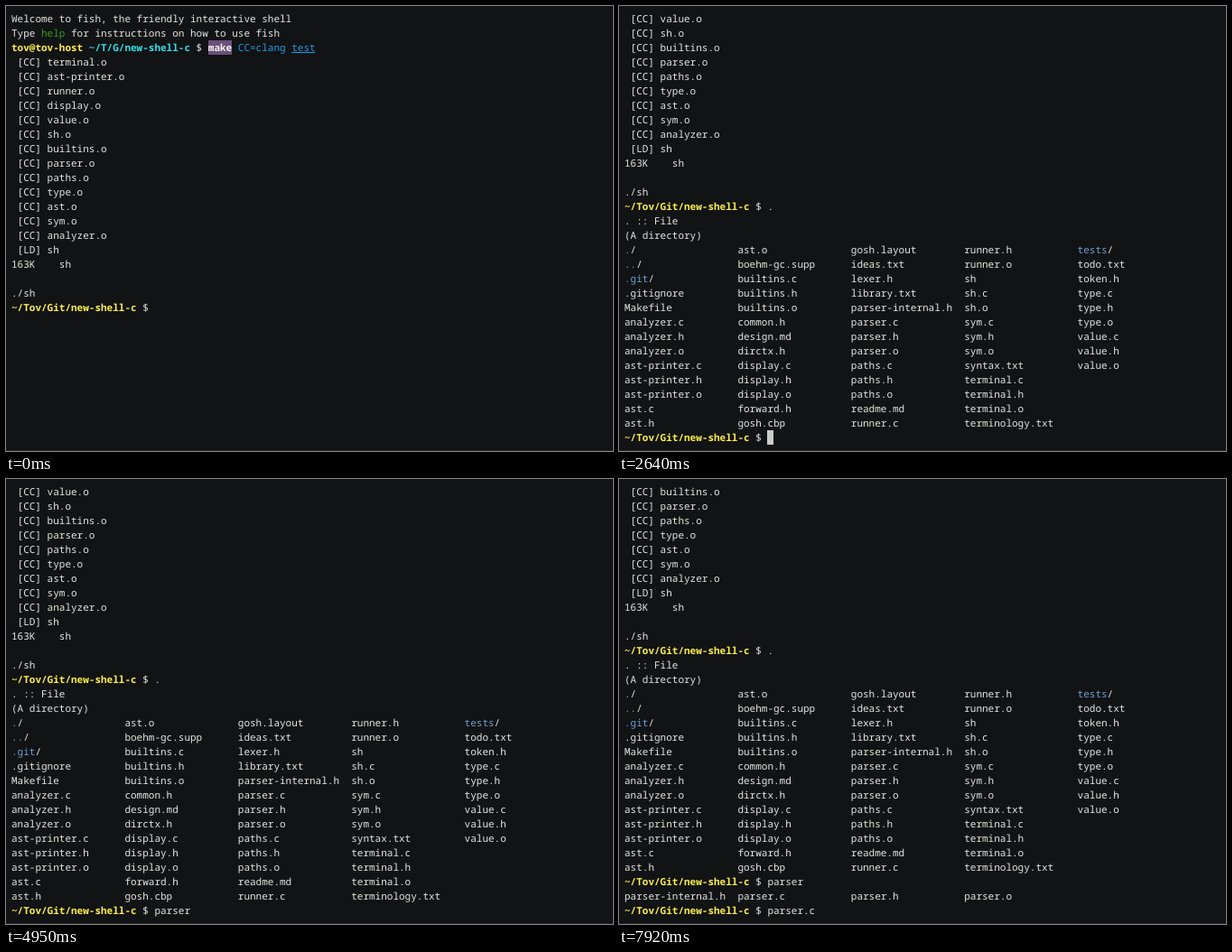
An HTML page with a canvas that plays this animation: 672x493 px, repeating every 8000 ms.

```html
<!DOCTYPE html>
<html lang="en">
<head>
<meta charset="utf-8">
<style>
html, body { margin: 0; width: 100%; height: 100%; overflow: hidden; background: #111315; }
canvas { display: block; }
</style>
</head>
<body>
<canvas id="term" width="672" height="493"></canvas>
<script>
const ctx = document.getElementById('term').getContext('2d');
const CELL = 6.6, LINE = 16, PAD = 6, LOOP = 8000;
const FONT = '11px "Noto Sans Mono", "DejaVu Sans Mono", monospace';

const STYLES = {
  text: { color: '#e6e6e1' },
  help: { color: '#3c9a20' },
  user: { color: '#fcee4f', bold: true },
  path: { color: '#34dfe8', bold: true },
  cmd: { color: '#f4f2f4', bold: true, back: '#6b5079' },
  arg: { color: '#1f9fe6' },
  link: { color: '#1f9fe6', underline: true },
  dir: { color: '#6f9fd2' }
};

// A row is a list of [column, text, style].
const plain = s => [[0, s, 'text']];
const seq = (...parts) => {
  let col = 0;
  return parts.map(([s, style = 'text']) => {
    const run = [col, s, style];
    col += s.length;
    return run;
  });
};
const prompt = typed => seq(['~/Tov/Git/new-shell-c', 'user'], [' $ ' + typed]);
const PROMPT_COLS = 24;

const entry = (name, i) => {
  const col = i * 19;
  if (!name.endsWith('/')) return [[col, name, 'text']];
  return [[col, name.slice(0, -1), 'dir'], [col + name.length - 1, '/', 'text']];
};
const listRow = names => names.flatMap(entry);

const objects = 'terminal ast-printer runner display value sh builtins parser paths type ast sym analyzer';
const files = [
  './ ../ .git/ .gitignore Makefile analyzer.c analyzer.h analyzer.o ast-printer.c ast-printer.h ast-printer.o ast.c ast.h',
  'ast.o boehm-gc.supp builtins.c builtins.h builtins.o common.h design.md dirctx.h display.c display.h display.o forward.h gosh.cbp',
  'gosh.layout ideas.txt lexer.h library.txt parser-internal.h parser.c parser.h parser.o paths.c paths.h paths.o readme.md runner.c',
  'runner.h runner.o sh sh.c sh.o sym.c sym.h sym.o syntax.txt terminal.c terminal.h terminal.o terminology.txt',
  'tests/ todo.txt token.h type.c type.h type.o value.c value.h value.o'
].map(s => s.split(' '));

const build = [
  plain('Welcome to fish, the friendly interactive shell'),
  seq(['Type '], ['help', 'help'], [' for instructions on how to use fish']),
  seq(['tov@tov-host', 'user'], [' '], ['~/T/G/new-shell-c', 'path'], [' $ '],
    ['make', 'cmd'], [' '], ['CC=clang', 'arg'], [' '], ['test', 'link']),
  ...objects.split(' ').map(name => plain(` [CC] ${name}.o`)),
  plain(' [LD] sh'),
  plain('163K    sh'),
  [],
  plain('./sh')
];
const listing = [
  ...build,
  prompt('.'),
  plain('. :: File'),
  plain('(A directory)'),
  ...files[0].map((_, r) => listRow(files.map(c => c[r]).filter(Boolean)))
];
const matches = [
  ...listing,
  prompt('parser'),
  listRow(['parser-internal.h', 'parser.c', 'parser.h', 'parser.o'])
];

// [start, history, typed, cursor shown]
const steps = [
  [0, build, '', false],
  [330, build, '', true],
  [660, build, '', false],
  [990, build, '.', true],
  [1650, listing, '', true],
  [1980, listing, '', false],
  [2640, listing, '', true],
  [2970, listing, '', false],
  [3300, listing, 'pa', true],
  [3630, listing, 'pars', true],
  [4290, listing, 'parser', true],
  [4950, listing, 'parser', false],
  [5280, matches, 'parser', true],
  [5940, matches, 'parser', false],
  [6270, matches, 'parser', true],
  [6930, matches, 'parser', false],
  [7260, matches, 'parser.', true],
  [7590, matches, 'parser.c', true],
  [7920, matches, 'parser.c', false]
];
const VISIBLE = 30;

function block(col, row, cols, color) {
  const x = Math.round(PAD + col * CELL);
  const right = Math.round(PAD + (col + cols) * CELL);
  ctx.fillStyle = color;
  ctx.fillRect(x, PAD + row * LINE, right - x, LINE);
}

function drawRun([col, s, style], row) {
  const { color, bold, back, underline } = STYLES[style];
  const x = PAD + col * CELL, y = PAD + row * LINE + 12;
  if (back) block(col, row, s.length, back);
  ctx.font = (bold ? 'bold ' : '') + FONT;
  ctx.fillStyle = color;
  ctx.fillText(s, x, y);
  if (underline) ctx.fillRect(Math.round(x), y + 1, Math.round(s.length * CELL), 1);
}

function draw(t) {
  const [, history, typed, cursor] = steps.findLast(s => s[0] <= t);
  ctx.fillStyle = '#111315';
  ctx.fillRect(0, 0, 672, 493);
  ctx.textRendering = 'geometricPrecision';
  const rows = [...history, prompt(typed)].slice(-VISIBLE);
  rows.forEach((runs, r) => runs.forEach(run => drawRun(run, r)));
  if (cursor) block(PROMPT_COLS + typed.length, rows.length - 1, 1, '#cccccc');
  ctx.fillStyle = '#2a2029';
  ctx.fillRect(0, 492, 672, 1);
}

const start = performance.now();
function tick() {
  draw((performance.now() - start) % LOOP);
  requestAnimationFrame(tick);
}
tick();
</script>
</body>
</html>
```
